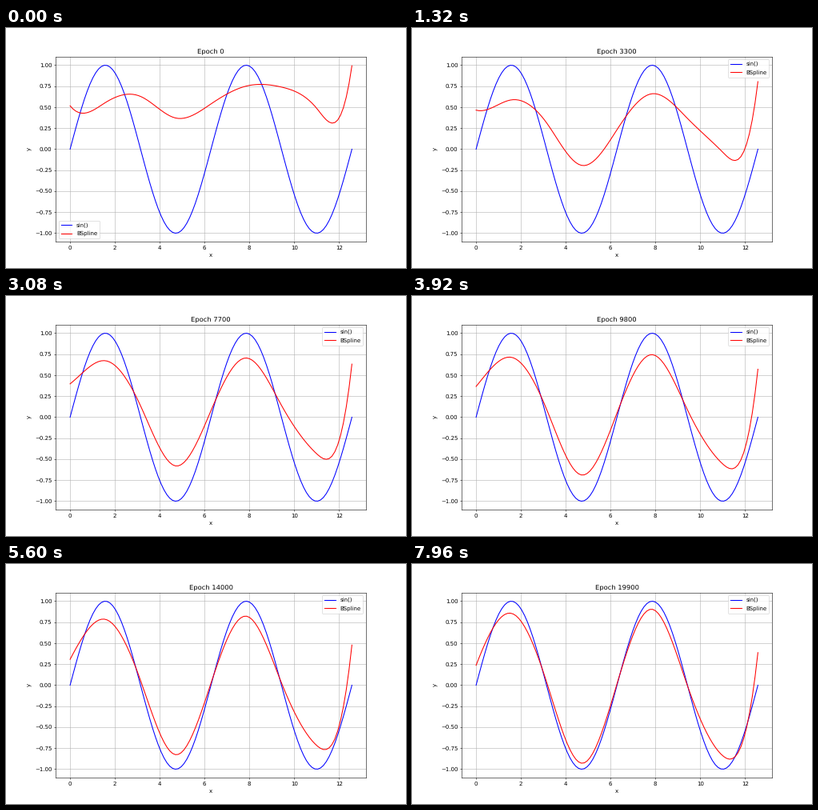
Recreate the animation shown at these times as a matplotlib script. Size 500 by 300 pixels, loop 8000 ms.

```python
import numpy as np
import matplotlib.pyplot as plt
from matplotlib.animation import FuncAnimation
from matplotlib.transforms import Affine2D

FRAMES, INTERVAL = 200, 40
EPOCHS_PER_FRAME = 100
RATE = 1e-3
DEGREE, SPANS = 3, 8
LENGTH = 4 * np.pi
WIDTH, HEIGHT = 500, 300
NUDGE = 0.25  # moves the axes up and left so grid lines snap to the right pixel


def basis_matrix(x):
    """Clamped uniform B-spline basis, one column per control value."""
    inner = np.linspace(0, LENGTH, SPANS + 1)
    t = np.r_[[0] * DEGREE, inner, [LENGTH] * DEGREE]
    span = np.minimum((x / LENGTH * SPANS).astype(int), SPANS - 1) + DEGREE
    b = (span[:, None] == np.arange(len(t) - 1)).astype(float)
    for d in range(1, DEGREE + 1):
        nxt = np.zeros((len(x), len(t) - 1 - d))
        for i in range(nxt.shape[1]):
            left, right = t[i + d] - t[i], t[i + d + 1] - t[i + 1]
            if left > 0:
                nxt[:, i] += (x - t[i]) / left * b[:, i]
            if right > 0:
                nxt[:, i] += (t[i + d + 1] - x) / right * b[:, i + 1]
        b = nxt
    return b


x = np.linspace(0, LENGTH, 100)
target = np.sin(x)
B = basis_matrix(x)

# Gradient descent on the mean squared error, solved in closed form
start = np.array([.517, .34, .595, .735, .235, .55, .80, .758, .606, .028, .993])
best = np.linalg.lstsq(B, target, rcond=None)[0]
eigval, eigvec = np.linalg.eigh(2 * B.T @ B / len(x))
offset = eigvec.T @ (start - best)


def curve(epoch):
    return B @ (best + eigvec @ ((1 - RATE * eigval) ** epoch * offset))


plt.rcParams["font.family"] = "DejaVu Sans"
plt.rcParams["text.hinting"] = "no_hinting"
fig, ax = plt.subplots(figsize=(WIDTH / 50, HEIGHT / 50), dpi=50)
dx, dy = NUDGE / WIDTH, NUDGE / HEIGHT
fig.subplots_adjust(left=0.125 - dx, right=0.9 - dx, bottom=0.11 + dy, top=0.88 + dy)
ax.set_xlim(-0.05 * LENGTH, 1.05 * LENGTH)
ax.set_ylim(-1.1, 1.1)

place = ax.transData + Affine2D().translate(NUDGE, -NUDGE)
ax.plot(x, target, color="blue", label="sin()", transform=place)
fit, = ax.plot(x, curve(0), color="red", label="BSpline", transform=place)
ax.set_xlabel("x")
ax.set_ylabel("y")
ax.grid(True)
ax.legend(loc="best")
title = ax.set_title("Epoch 0")


def update(frame):
    epoch = frame * EPOCHS_PER_FRAME
    fit.set_ydata(curve(epoch))
    title.set_text(f"Epoch {epoch}")
    return fit, title


anim = FuncAnimation(fig, update, frames=FRAMES, interval=INTERVAL,
                     init_func=lambda: update(0), repeat=True, repeat_delay=0)
plt.show()
```
